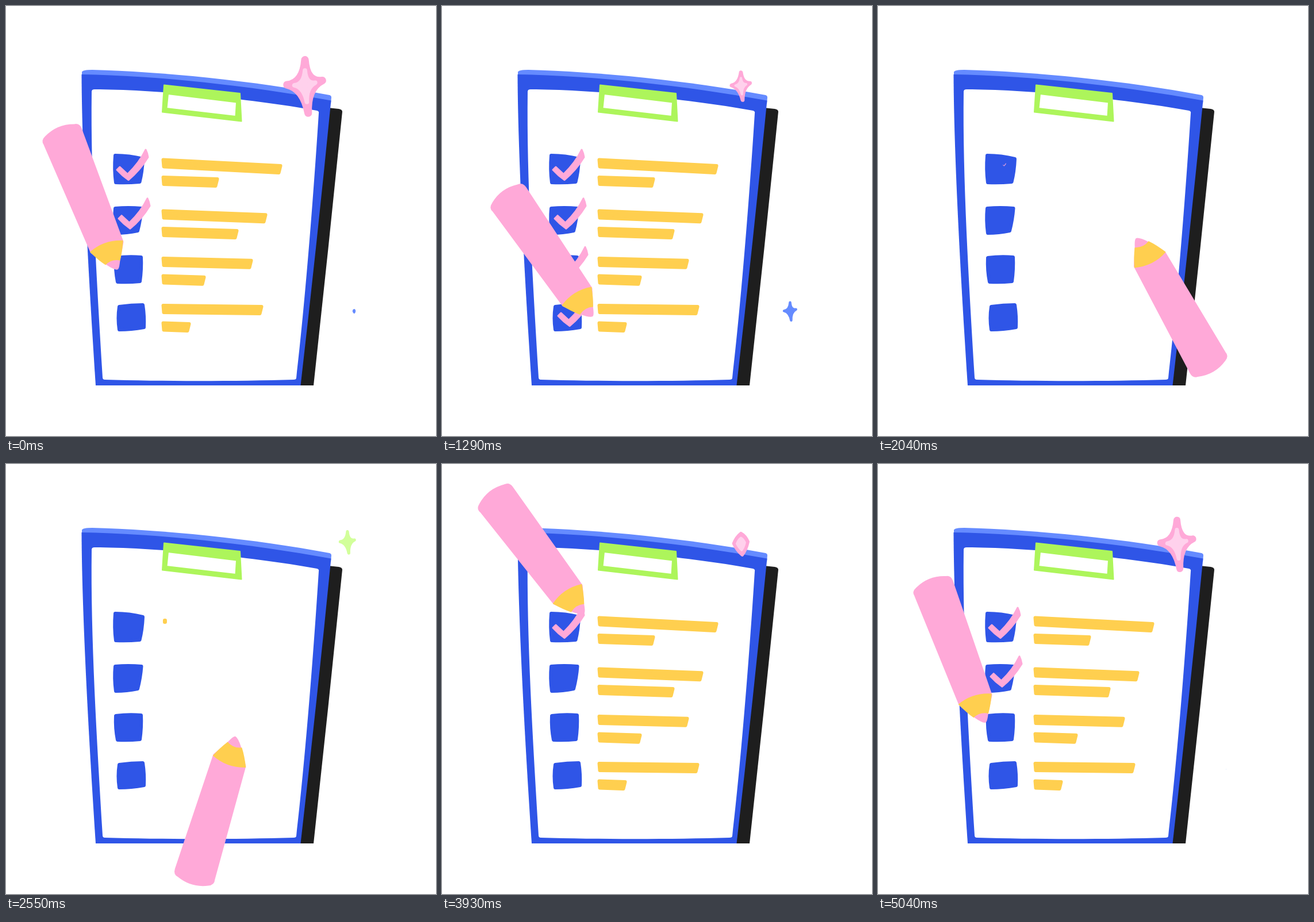
Recreate the animation shown at these times as an HTML page with a canvas. Size 748 px wide and 748 px high, loop 5.07 s.

```html
<!DOCTYPE html>
<html lang="en">
<head>
<meta charset="utf-8">
<title>Checklist</title>
<style>
html, body { margin: 0; width: 100%; height: 100%; overflow: hidden; background: #fff; }
canvas { display: block; }
</style>
</head>
<body>
<canvas id="stage" width="748" height="748"></canvas>
<script>
const LOOP = 5070, STEP = 30, BEAT = LOOP / 5;
const ROW_TIME = 735, ROW_X = 3, ROW_Y = 84.7, FIRST_CHECK = 3600, WRITE = 330;
const ctx = document.getElementById('stage').getContext('2d');
const PINK = '#ffa9d8', YELLOW = '#ffcf4f', BLUE = '#2f55e7', SKY = '#658bff';

const clamp = v => Math.max(0, Math.min(1, v));
const ease = v => (1 - Math.cos(Math.PI * clamp(v))) / 2;
const mod = (a, n) => ((a % n) + n) % n;

function fill(path, color, stroke) {
  const p = new Path2D(path);
  ctx.fillStyle = ctx.strokeStyle = color;
  ctx.fill(p, 'evenodd');
  if (stroke) {
    ctx.lineWidth = stroke;
    ctx.lineJoin = ctx.lineCap = 'round';
    ctx.stroke(p);
  }
}

function drawBoard() {
  fill('M560 177L579 179Q585 180 585 184Q561 422 535 660H505Z', '#1e1e1e');
  fill('M132 122V115Q133 111 150 111C270 114 430 130 563 155Q566 156 566 159L565 170Z', SKY);
  fill('M131.500 119C260 121 420 138 565.500 164.500Q541 412 512.500 660H156C148 540 132 280 131.500 119Z', BLUE);
  fill('M149 149Q149 145 154 145C250 145 420 160 541 182Q545 183 544 187C535 330 520 520 505 647Q505 650 500 650C400 653 270 653 172 650Q168 650 168 646C158 480 147 300 149 149Z', '#fff');
  fill('M275 137.500L407 152L409.500 200.500L272 184.500ZM282 153L401 167.500L399.500 192L279.500 178Z', '#adf55b', 2);
  fill('M190 260Q215 260 238 266Q237 288 232.500 306Q210 308 191 307Q188 285 190 260Z', BLUE, 6);
  fill('M190 352Q213 350 235.500 352Q234 372 229 391Q210 395 191 395Q188 373 190 352Z', BLUE, 6);
  fill('M191 438Q213 435 235 437Q236 458 233 479Q213 481 194 480Q190 460 191 438Z', BLUE, 6);
  fill('M197 523Q218 520 238 520Q241 540 240 559Q218 563 197 563Q194 543 197 523Z', BLUE, 6);
}

// Pencil poses: time, tip x, tip y, angle. One sweep, then one tick per row.
const poses = [
  [1290, 262, 540, -34.5], [1600, 350, 450, 60], [2040, 449, 404, 151],
  [2550, 399, 474, 197.3], [2850, 350, 440, 195], [3180, 206, 245, 98],
  [3380, 188, 262, -30]
];
const tick = [[0, 188, 289, -21.5], [140, 212, 303, -38], [WRITE, 247, 260, -36.6], [705, 184, 365, -20.2]];
for (let row = 0; row < 4; row++) {
  for (const [t, x, y, angle] of row < 3 ? tick : tick.slice(0, 3)) {
    poses.push([mod(FIRST_CHECK + ROW_TIME * row + t, LOOP), x + ROW_X * row, y + ROW_Y * row, angle]);
  }
}
poses.sort((a, b) => a[0] - b[0]);

function pose(i) {
  const [t, ...rest] = poses[mod(i, poses.length)];
  return [t + LOOP * Math.floor(i / poses.length), ...rest];
}

// Smooth curve through the poses
function pencilPose(time) {
  const t = mod(time, LOOP);
  let i = poses.length - 1;
  while (poses[i][0] > t) i--;
  const [a, b, c, d] = [-1, 0, 1, 2].map(k => pose(i + k));
  const span = c[0] - b[0], u = (t - b[0]) / span;
  return [1, 2, 3].map(k => {
    const m = (c[k] - a[k]) / (c[0] - a[0]) * span, n = (d[k] - b[k]) / (d[0] - b[0]) * span;
    const rise = c[k] - b[k];
    return b[k] + u * (m + u * (3 * rise - 2 * m - n + u * (m + n - 2 * rise)));
  });
}

// A fast turn fans the tail out
function drawPencil(t) {
  const [x, y, angle] = pencilPose(t);
  const speed = Math.abs(pencilPose(t + 15)[2] - pencilPose(t - 15)[2]) / 30;
  const s = clamp((speed - .2) / .18);
  const left = -38 - 38 * s, right = 29 + 45 * s, end = -258 + 14 * s;
  ctx.save();
  ctx.translate(x, y);
  ctx.rotate(angle * Math.PI / 180);
  fill(`M${left + 1} ${end + 9}Q${left - 1} ${end + 2} ${left + 7} ${end - 1}` +
    `Q-5 ${-271 - 20 * s} ${right - 7} ${end - 2}Q${right} ${end - 1} ${right} ${end + 7}` +
    'L24.500 -42L7 -14Q2 -4 0 -3Q-4 -4 -13 -17L-30 -45Z', PINK, 6);
  fill('M-33.500 -46Q-3 -57 27.500 -43.500Q20 -27 10 -13Q-3 -21 -16.500 -15Q-25 -27 -33.500 -46Z', YELLOW);
  ctx.restore();
}

function drawBar(x, y, length, drop, p) {
  if (p <= 0) return;
  const w = 6 + p * (length - 6), h = Math.min(18, w + 2);
  const left = x + 3 + 4 * (1 - clamp(w / 18)), right = left + w - 6;
  const half = h / 2 - 3, dy = drop * p, lean = 3 * clamp((w - 15) / 15);
  fill(`M${left} ${y - half}L${right} ${y + dy - half}L${right - lean} ${y + dy + half}L${left + lean / 3} ${y + half}Z`, YELLOW, 6);
}

// Each row: y, length of the long bar, length of the short bar
const rows = [[273.5, 210, 100], [362.5, 184, 134], [445, 159, 77], [527, 177, 51]];

function drawBars(t) {
  rows.forEach(([y, ...lengths], row) => lengths.forEach((length, short) => {
    const i = 2 * row + short;
    const p = ease((t - 2525 - 93 * i) / 560) - ease((t - 6410 - 45 * (7 - i)) / 300);
    const slope = short ? .03 : .05 - .013 * row;
    drawBar(270.5, y + 30.5 * short, length, length * slope, p);
  }));
}

function drawCheck(row, t, tipX) {
  const start = FIRST_CHECK + ROW_TIME * row, gone = 7180 - 90 * row;
  if (t < start || t >= gone) return;
  const size = 1 - ease((t - gone + 350) / 350);
  ctx.save();
  if (t < start + WRITE) {
    ctx.beginPath();
    ctx.rect(0, 0, tipX + 3, 748);
    ctx.clip();
  }
  ctx.translate(220 + ROW_X * row, 276 + ROW_Y * row);
  ctx.scale(size, size);
  ctx.translate(-220, -276);
  fill('M193 285L198 280L211.500 292.500Q232 273 243 250Q246 256 247 263Q233 286 213 302.500Q202 295 193 285Z', PINK, 3);
  ctx.restore();
}

const tips = [[0, -48], [32, -10], [6, 50], [-33, -2]];

// Small stars swell into ovals
function drawStar(x, y, size, s, color, core) {
  if (s <= .01) return;
  const bend = .1 + .7 * clamp((.5 - s) / .15);
  const shape = `M${tips[0]}` + tips.map((a, i) => {
    const b = tips[(i + 1) % 4];
    return `Q${(a[0] + b[0]) * bend},${(a[1] + b[1]) * bend} ${b}`;
  }).join('') + 'Z';
  ctx.save();
  ctx.translate(x, y);
  ctx.scale(s * size, s * size);
  fill(shape, color, 14);
  if (core) {
    ctx.scale(.59, .59);
    fill(shape, core, 14);
  }
  ctx.restore();
}

function pulse(t, starts) {
  const age = Math.min(...starts.map(s => mod(t - s, LOOP)));
  return age < 235 ? Math.sin(age / 235 * Math.PI / 2) : 1 - ease((age - 235) / 445);
}
const beats = lag => [1, 3, 4, 5].map(k => k * BEAT + lag);

function draw(t) {
  const late = t < 2200 ? t + LOOP : t;
  ctx.fillStyle = '#fff';
  ctx.fillRect(0, 0, 748, 748);
  drawBoard();
  drawBars(late);
  const [tipX] = pencilPose(t);
  for (let row = 0; row < 4; row++) drawCheck(row, late, tipX);
  drawStar(520, 139, 1, pulse(t, beats(-185)), PINK, '#ffd1ec');
  drawStar(605.5, 531, .34, pulse(t, beats(-32)), SKY);
  drawStar(594, 136, .45, pulse(t, [2200, 3110]), '#d2ff9a');
  drawPencil(t);
}

function frame() {
  draw(Math.floor(performance.now() % LOOP / STEP) * STEP);
  requestAnimationFrame(frame);
}
frame();
</script>
</body>
</html>
```
